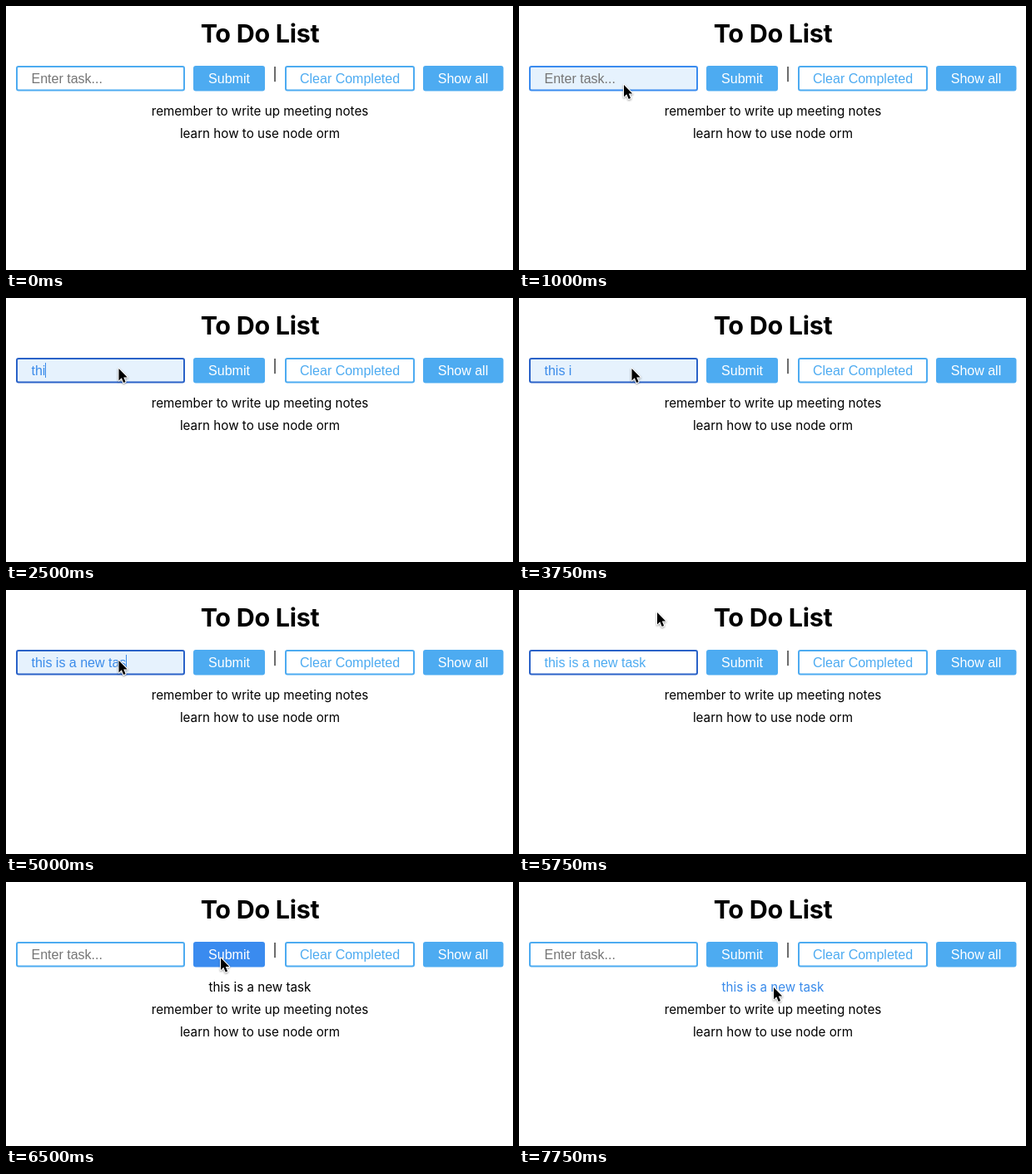
These frames come from a looping animation (609 px wide and 318 px high, 8 s). An HTML page:

```html
<!DOCTYPE html>
<html lang="en">
<head>
<meta charset="utf-8">
<title>To Do List</title>
<style>
  html, body { margin: 0; width: 100%; height: 100%; overflow: hidden; background: #fff; }
  svg { display: block; width: 609px; height: 318px; }
  text { font: 15.2px Inter, sans-serif; white-space: pre; }
  .mid { text-anchor: middle; }
  .title { font-size: 30.5px; font-weight: 700; letter-spacing: -.3px; }
  .ui { font: 16px "Liberation Sans", Arial, sans-serif; }
  .line { stroke-width: 2; }
  #cursor { stroke: #fff; stroke-width: 2; stroke-linejoin: round; paint-order: stroke;
    filter: drop-shadow(0 1px 1px rgba(0, 0, 0, .4)); }
</style>
</head>
<body>
<svg viewBox="0 0 609 318">
  <text class="mid title" x="305" y="43.5">To Do List</text>

  <rect id="field" class="line" x="13" y="73" width="201" height="28.5" rx="2"/>
  <text id="entry" class="ui" x="30.5" y="92.7"></text>
  <rect id="caret" y="78" width="1" height="18" fill="#3a8bea"/>

  <rect id="submit" x="225" y="72" width="86" height="30.5" rx="3"/>
  <text class="ui mid" x="268" y="92.7" fill="#fff">Submit</text>
  <text class="mid" x="323" y="87.5">|</text>
  <rect class="line" x="336" y="73" width="154" height="28.5" rx="2" fill="#fff" stroke="#4dabf1"/>
  <text class="ui mid" x="413" y="92.7" fill="#4dabf1">Clear Completed</text>
  <rect x="501" y="72" width="96.5" height="30.5" rx="3" fill="#4dabf1"/>
  <text class="ui mid" x="549" y="92.7" fill="#fff">Show all</text>

  <text id="added" class="mid" x="305" y="132">this is a new task</text>
  <g id="tasks">
    <text class="mid" x="305" y="132">remember to write up meeting notes</text>
    <text class="mid" x="305" y="159">learn how to use node orm</text>
  </g>

  <path id="cursor" d="M0 0V14.4L3.3 11.3L5.7 17L8.1 16L5.8 10.5H10.2Z"/>
</svg>
<script>
const LOOP = 8000;
const LIGHT = '#4dabf1', HOVER = '#3a8bef', DARK = '#2a62c8', INK = '#3a8bea';

const start = {
  at: null, text: '', caret: false, border: LIGHT, fill: '#fff', ink: INK,
  submit: LIGHT, added: false, addedInk: '#000'
};

// Each step lists only what changes at that time.
const steps = [
  [0, {}],
  [250, { at: [349, 136] }],
  [500, { at: [131, 96] }],
  [750, { at: [102, 88] }],
  [1000, { at: [126, 95], border: HOVER, fill: '#e6f2fd' }],
  [1250, { at: [113, 94], border: DARK, caret: true }],
  [1500, { at: [135.5, 85] }],
  [1750, { caret: false }],
  [2250, { caret: true }],
  [2500, { text: 'thi' }],
  [2750, { text: 'this ' }],
  [3000, { text: 'this i' }],
  [3250, { text: 'this si ' }],
  [3750, { text: 'this i', caret: false }],
  [4000, { text: 'this is ', caret: true }],
  [4250, { text: 'this is a n' }],
  [4500, { text: 'this is a new ' }],
  [5000, { text: 'this is a new tas' }],
  [5250, { text: 'this is a new task' }],
  [5750, { at: [166, 27], caret: false, fill: '#fff', ink: LIGHT }],
  [6000, { at: [256.5, 73] }],
  [6250, { at: [258, 91.5], caret: true, submit: HOVER }],
  [6500, { text: '', caret: false, border: LIGHT, added: true }],
  [7500, { at: [302, 130], submit: LIGHT, addedInk: INK }],
  [7750, { at: [306, 127] }]
];

let last = start;
const states = steps.map(([time, change]) => [time, last = { ...last, ...change }]);

const $ = id => document.getElementById(id);
const set = (id, attrs) => {
  for (const name in attrs) $(id).setAttribute(name, attrs[name]);
};
const show = on => on ? 'visible' : 'hidden';

const pen = document.createElement('canvas').getContext('2d');
pen.font = '16px "Liberation Sans", Arial, sans-serif';

function draw(s) {
  set('field', { fill: s.fill, stroke: s.border });
  $('entry').textContent = s.text || 'Enter task...';
  set('entry', { fill: s.text ? s.ink : '#757575' });
  set('caret', {
    x: Math.round(30.5 + pen.measureText(s.text).width),
    visibility: show(s.caret)
  });
  set('submit', { fill: s.submit });
  set('added', { visibility: show(s.added), fill: s.addedInk });
  set('tasks', { transform: `translate(0 ${s.added ? 27 : 0})` });
  set('cursor', {
    visibility: show(s.at),
    transform: `translate(${s.at || [0, 0]})`
  });
}

let shown;
function tick() {
  const t = performance.now() % LOOP;
  const state = states.findLast(([time]) => time <= t)[1];
  if (state !== shown) draw(shown = state);
  requestAnimationFrame(tick);
}
tick();
</script>
</body>
</html>
```
